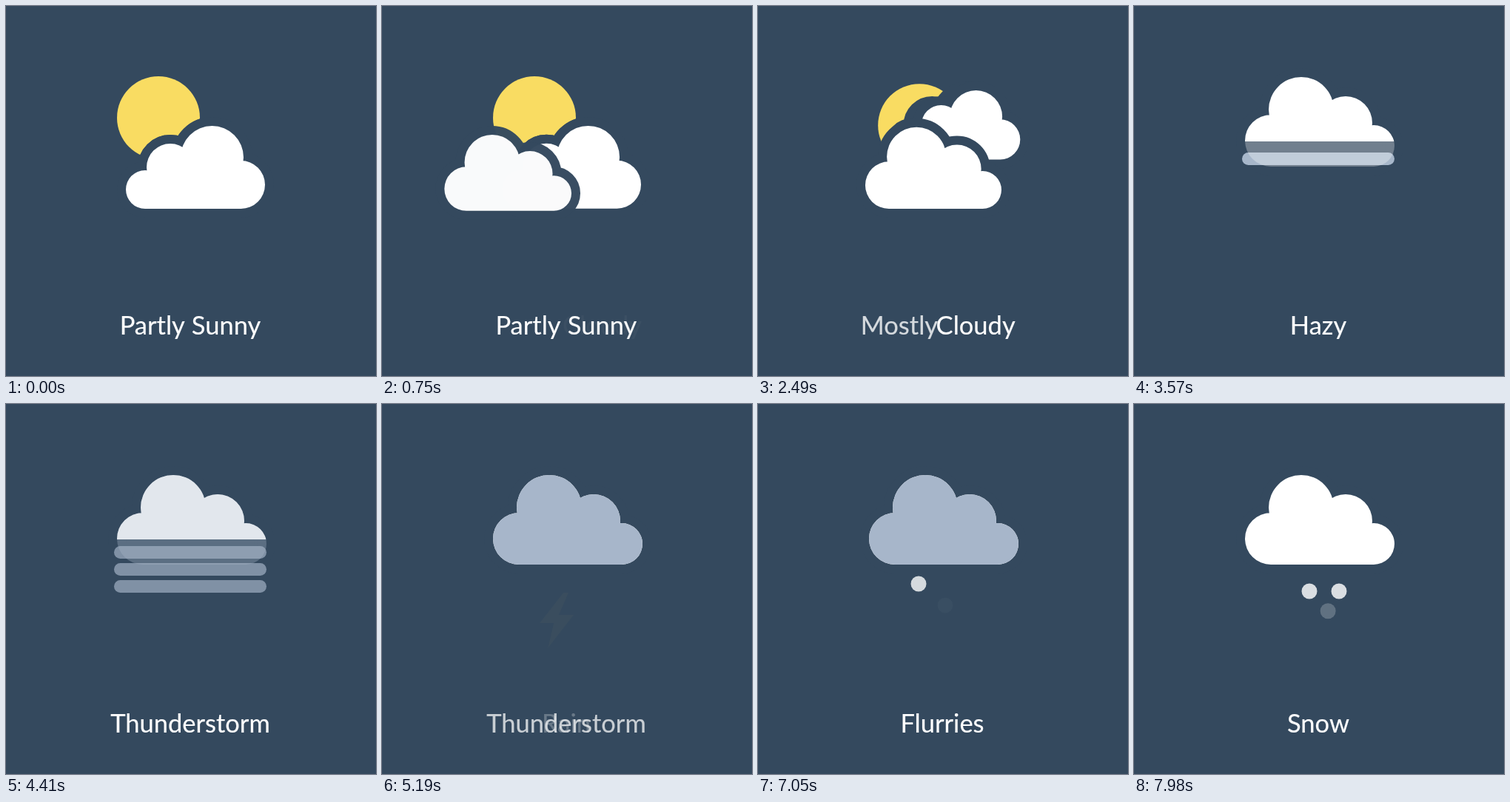
These frames come from a looping animation (500x500 px, 8000 ms). An HTML page:

```html
<!DOCTYPE html>
<html lang="en">
<head>
<meta charset="utf-8">
<title>Weather states</title>
<style>
  html, body { margin: 0; width: 100%; height: 100%; overflow: hidden; background: #34495e; }
  svg { display: block; width: 100vw; height: 100vh; }
  text { font: 34.5px Lato, "Open Sans", sans-serif; fill: #fff; stroke: #fff; stroke-width: .2px; text-anchor: middle; }
</style>
</head>
<body>
<svg id="stage" viewBox="0 0 500 500">
  <clipPath id="above"><rect width="500" height="183"/></clipPath>
  <clipPath id="below"><rect y="183" width="500" height="317"/></clipPath>
</svg>
<script>
const LOOP = 8000, BG = '#34495e', GREY = '#a7b6ca', GAP = 12, STEP = 150;
const svg = document.getElementById('stage');

// label, start and length of the change into the scene
const scenes = [
  ['Partly Sunny', 0, 0],
  ['Partly Cloudy', 630, 600],
  ['Mostly Cloudy', 1500, 330],
  ['Cloudy', 2280, 570],
  ['Hazy', 3120, 330],
  ['Thunderstorm', 4200, 200],
  ['Rain', 5070, 300],
  ['Sleet', 5880, 300],
  ['Flurries', 6630, 300],
  ['Snow', 7440, 300]
].map(([label, start, len]) => ({ label, start, end: start + len }));
const [, partly, , cloudy, hazy, storm, rain, sleet, flurries, snow] = scenes;

function add(tag, attrs, parent = svg) {
  const el = document.createElementNS('http://www.w3.org/2000/svg', tag);
  set(el, attrs);
  parent.append(el);
  return el;
}
function set(el, attrs) {
  for (const k in attrs) el.setAttribute(k, attrs[k]);
}

const inOut = n => p => p < .5 ? (2 * p) ** n / 2 : 1 - (2 - 2 * p) ** n / 2;
const linear = inOut(1), smooth = inOut(3), glide = inOut(5);

// keys: [ms, value, value...]; returns the values at time t
function at(keys, t, ease = smooth) {
  if (t <= keys[0][0]) return keys[0].slice(1);
  for (let i = 1; i < keys.length; i++) {
    const a = keys[i - 1], b = keys[i];
    if (t < b[0]) {
      const p = ease((t - a[0]) / (b[0] - a[0]));
      return a.slice(1).map((v, j) => v + (b[j + 1] - v) * p);
    }
  }
  return keys[keys.length - 1].slice(1);
}

// One pose per scene, each reached while the scene changes
const poses = list => list.flatMap((pose, i) => i
  ? [[scenes[i].start, ...list[i - 1]], [scenes[i].end, ...pose]]
  : [[0, ...pose]]);

// A cloud is four circles on a flat base
function cloudPath(lobes, base) {
  const [first, last] = [lobes[0], lobes[3]];
  const core = [...lobes.map(c => c.slice(0, 2)), [last[0], base], [first[0], base]];
  return 'M' + core.join('L') + 'Z' + lobes.map(([x, y, r]) =>
    `M${x - r},${y}a${r},${r} 0 1 1 ${2 * r},0a${r},${r} 0 1 1 ${-2 * r},0Z`).join('');
}
const BACK = cloudPath([[26, 86, 26], [60, 56, 32], [116.5, 42.5, 42.5], [155.5, 79.5, 32.5]], 112);
const FRONT = cloudPath([[35, 86, 35], [76, 44, 44], [136, 62, 36], [174, 93, 28]], 121);

const gap = d => add('path', { d, fill: BG, stroke: BG, 'stroke-linejoin': 'round' });
const cloud = (d, fill, clip) =>
  add('path', { d, fill }, add('g', clip ? { 'clip-path': `url(#${clip})` } : {}));

function place(el, [x, y, s], opacity = 1) {
  set(el, { transform: `translate(${x} ${y}) scale(${s})`, 'stroke-width': 2 * GAP / s, opacity });
}

const sun = add('circle', { r: 56, fill: '#f9dc62' });
const notch = gap(BACK), backGap = gap(BACK), back = cloud(BACK, '#fff');
const frontGap = gap(FRONT);

// Haze bars slide out one after another, then rise and fade
const bars = [0, 1, 2].map(i => {
  const y = 198 + 23 * i, a = hazy.start + 300 + STEP * i;
  return {
    el: add('rect', { x: 146, width: 206, height: 17, rx: 8.5, fill: GREY }),
    y: [[a, y - 23], [a + STEP, y], [storm.start, y], [storm.start + 630, y - 40]],
    fade: [[a, 0], [a + STEP, 1], [storm.start, 1], [storm.start + 630, 0]]
  };
});

const lower = cloud(FRONT, '#fff', 'below');
const upper = cloud(FRONT, '#fff', 'above');
const grey = cloud(FRONT, GREY);
place(grey, [150, 96, 1]);

const backPose = poses([[162, 162, 1], [228, 142, .67], [200, 117.5, .82], [177, 86, .95], [195, 125, .62]]);
const frontPose = poses([[84, 174, .85], [144.3, 172, .85], [145, 165, .9], [144.5, 154, 1], [150, 96, 1]]);
const sunSet = [[cloudy.start, 0], [cloudy.end, 1]];
const sunFade = [[cloudy.end - 250, 1], [cloudy.end, 0]];
const backFade = [[hazy.start + 120, 1], [hazy.end, 0]];
const frontFade = [[partly.start, 0], [partly.start + STEP, 1]];
const lowerFade = [[hazy.start + 240, 1], [hazy.start + 540, 0], [storm.start + 630, 0], [rain.start, 1]];
const greyFade = [[storm.start, 0], [storm.start + 630, 1], [snow.start, 1], [snow.start + 510, 0]];

// Parts under the cloud: enter left to right, leave right to left
const drop = n => [add('path', {
  d: `M${210.5 + 37 * n},240l-25.5,44`,
  stroke: '#6cb9ea', 'stroke-width': 16, 'stroke-linecap': 'round'
}), 1];
const dot = (cx, cy) => [add('circle', { cx, cy, r: 10.5, fill: '#fff' }), .82];
const bolt = () => [add('path', { d: 'M260,229L228,270H247L239,304L274,259H254L267,229Z', fill: '#f9dc62' }), 1];

const parts = [
  [storm, bolt()],
  [rain, drop(0), drop(1), drop(2)],
  [sleet, drop(0), drop(1), dot(270, 279), dot(291, 243)],
  [flurries, dot(217, 243), dot(251, 276), dot(285, 243)],
  [snow, dot(237, 253), dot(277, 253), dot(260.5, 283)]
].flatMap(([scene, ...list]) => list.map(([el, peak], i) => {
  const next = scenes[scenes.indexOf(scene) + 1];
  const a = scene.start + 300 + 90 * i;
  const b = next ? next.start + 90 * (list.length - 1 - i) : LOOP + STEP;
  return {
    el,
    move: [[a, 2, -4], [a + STEP, 0, 0], [b, 0, 0], [b + STEP, -15, 26]],
    fade: [[a, 0], [a + STEP, peak], [b, peak], [b + STEP, 0]]
  };
}));

// Words shared by neighbouring scenes slide, the others crossfade
const words = {};
scenes.forEach(({ label, start, end }, i) => {
  const row = label.split(' ');
  for (const w of row) {
    if (words[w]) continue;
    const el = add('text', { y: 443.5 });
    el.textContent = w;
    words[w] = { el, width: el.getComputedTextLength(), x: [], fade: i ? [[start, 0], [end, 1]] : [[0, 1]] };
  }
  const space = 9;
  let left = 249 - row.reduce((sum, w) => sum + words[w].width + space, -space) / 2;
  for (const w of row) {
    const { x, width } = words[w], centre = left + width / 2;
    if (x.length) x.push([start, x[x.length - 1][1]]);
    x.push([end, centre]);
    left += width + space;
  }
  const before = i ? scenes[i - 1].label.split(' ') : [];
  for (const w of before) if (!row.includes(w)) words[w].fade.push([start, 1], [end, 0]);
});

function draw(t) {
  const set01 = at(sunSet, t)[0];
  set(sun, { cx: 206 + 60 * set01, cy: 151 + 50 * set01, opacity: at(sunFade, t)[0] });

  const [bx, by, bs] = at(backPose, t, glide), shownBack = at(backFade, t)[0];
  place(notch, [bx - 60 * set01, by, bs], shownBack);
  for (const el of [backGap, back]) place(el, [bx, by, bs], shownBack);

  const pose = at(frontPose, t, glide), shown = at(frontFade, t)[0];
  for (const el of [frontGap, upper]) place(el, pose, shown);
  place(lower, pose, shown * at(lowerFade, t, linear)[0]);
  set(grey, { opacity: at(greyFade, t, linear)[0] });

  for (const b of bars) set(b.el, { y: at(b.y, t)[0], opacity: at(b.fade, t, linear)[0] });
  for (const p of parts) {
    set(p.el, { transform: `translate(${at(p.move, t, glide)})`, opacity: at(p.fade, t)[0] });
  }
  for (const w of Object.values(words)) set(w.el, { x: at(w.x, t)[0], opacity: at(w.fade, t)[0] });
}

const start = performance.now();
function tick() {
  draw((performance.now() - start) % LOOP);
  requestAnimationFrame(tick);
}
draw(0);
requestAnimationFrame(tick);
</script>
</body>
</html>
```
